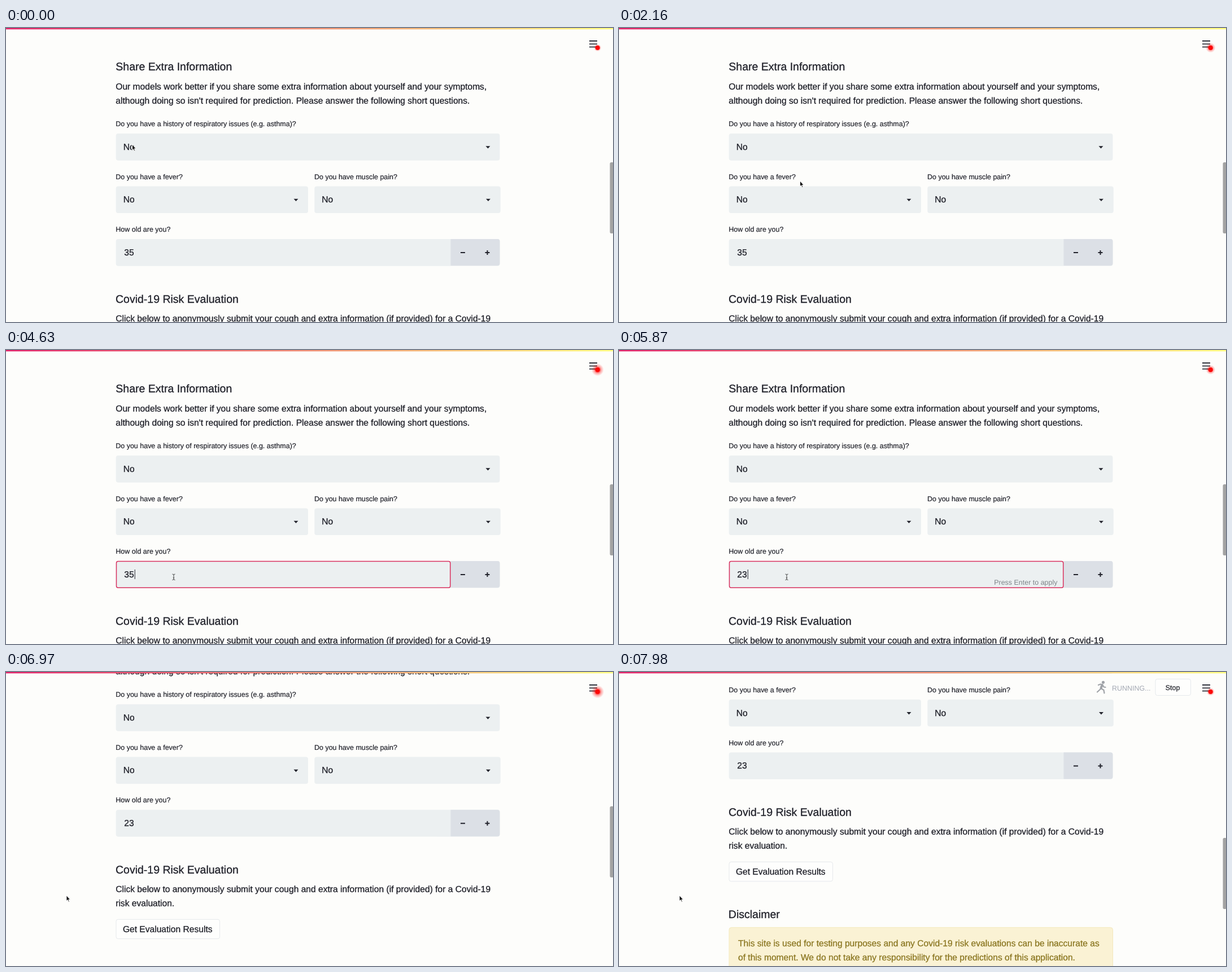
Recreate the animation shown at these times as an HTML page. Size 1075 by 521 pixels, loop 8000 ms.

```html
<!DOCTYPE html>
<html lang="en">
<head>
<meta charset="utf-8">
<title>Share Extra Information</title>
<style>
  html, body { margin: 0; width: 100%; height: 100%; overflow: hidden; background: #fdfdfb; }
  svg { display: block; width: 1075px; height: 521px; }
  text {
    font: 15.6px "Liberation Sans", Arial, sans-serif;
    fill: #1f2029; stroke: #1f2029; stroke-width: .3px;
    text-rendering: geometricPrecision; white-space: pre;
  }
  .h { font-size: 19.5px; }
  .s { font-size: 12.48px; stroke-width: .2px; }
  .field { fill: #ecf0f1; }
  .btn { fill: #fefefd; stroke: #e6e9ec; }
  .warn { fill: #8a7620; stroke: #8a7620; }
  .dim { fill: #a3a8b3; stroke: none; }
  .hint { fill: #7d8388; stroke: none; }
</style>
</head>
<body>
<svg viewBox="0 0 1075 521">
  <defs>
    <linearGradient id="bar">
      <stop stop-color="#e2226a"/><stop offset="1" stop-color="#fffd80"/>
    </linearGradient>
    <radialGradient id="halo">
      <stop offset=".3" stop-color="#f00" stop-opacity=".75"/>
      <stop offset=".6" stop-color="#f00" stop-opacity=".3"/>
      <stop offset="1" stop-color="#f00" stop-opacity="0"/>
    </radialGradient>
    <path id="drop" d="M-4-2H4L0 2.3Z" fill="#22232c"/>
  </defs>

  <g id="page">
    <text class="h" x="194.3" y="75">Share Extra Information</text>
    <text x="194.3" y="108.7">Our models work better if you share some extra information about yourself and your symptoms,</text>
    <text x="194.3" y="133.7">although doing so isn't required for prediction. Please answer the following short questions.</text>

    <text class="s" x="194.3" y="174">Do you have a history of respiratory issues (e.g. asthma)?</text>
    <rect class="field" x="194.7" y="187" width="679.8" height="47.7" rx="4"/>
    <text x="207.7" y="215.6">No</text>
    <use href="#drop" x="853.5" y="211.3"/>

    <text class="s" x="194.3" y="267.6">Do you have a fever?</text>
    <rect class="field" x="194.7" y="280.4" width="340.3" height="47.7" rx="4"/>
    <text x="207.7" y="309.2">No</text>
    <use href="#drop" x="513.5" y="304.7"/>

    <text class="s" x="546" y="267.6">Do you have muscle pain?</text>
    <rect class="field" x="546.3" y="280.4" width="329.5" height="47.7" rx="4"/>
    <text x="559.3" y="309.2">No</text>
    <use href="#drop" x="854" y="304.7"/>

    <text class="s" x="194.3" y="361.2">How old are you?</text>
    <rect class="field" x="194.7" y="374" width="679.8" height="47.7" rx="4"/>
    <path d="M787.5 374H870.5a4 4 0 0 1 4 4V417a4 4 0 0 1-4 4H787.5Z" fill="#dce0e6"/>
    <path d="M805 398H813M848.5 398H856.5M852.5 394V402" stroke="#22232c" stroke-width="2"/>
    <text id="age" x="209.3" y="402.8">35</text>
    <g id="focus">
      <rect x="195.5" y="374.5" width="591.3" height="46.8" rx="3" fill="none" stroke="#d8315f" stroke-width="1.5"/>
      <path id="caret" d="M0 389V406" stroke="#22232c"/>
      <text id="hint" class="s hint" x="664.2" y="415.7">Press Enter to apply</text>
    </g>

    <text class="h" x="194" y="487">Covid-19 Risk Evaluation</text>
    <text x="194.2" y="519.7">Click below to anonymously submit your cough and extra information (if provided) for a Covid-19</text>
    <text x="194.2" y="544.7">risk evaluation.</text>
    <rect class="btn" x="195" y="568.2" width="183.5" height="34.3" rx="3.5"/>
    <text x="206.9" y="590.8">Get Evaluation Results</text>

    <text class="h" x="193.8" y="668">Disclaimer</text>
    <rect x="195" y="684.4" width="679.5" height="76" rx="4" fill="#faf2d4" stroke="#f3e8bd"/>
    <text class="warn" x="211" y="718">This site is used for testing purposes and any Covid-19 risk evaluations can be inaccurate as</text>
    <text class="warn" x="211" y="743">of this moment. We do not take any responsibility for the predictions of this application.</text>
  </g>

  <rect width="1075" height="2.4" fill="url(#bar)"/>

  <g id="status">
    <g fill="none" stroke="#a0a3a8" stroke-width="2.2" stroke-linecap="round" stroke-linejoin="round">
      <circle cx="857.5" cy="18.3" r="1.5" fill="#a0a3a8"/>
      <path d="M849 23L853 21.5L856.5 22.5L853.5 29.5L847 35.5M853.5 29L858.5 32L859.5 37.5M856.5 23L858.5 26.5L861.5 27"/>
      <path d="M855.5 23L853.5 29" stroke-width="4"/>
    </g>
    <text class="s dim" x="873" y="32.6">RUNNING...</text>
    <rect class="btn" x="950" y="12.5" width="62.5" height="29" rx="3.5"/>
    <text class="s" x="967.8" y="31.6">Stop</text>
  </g>

  <path d="M1033 23H1047M1033 28.3H1047M1033 33.6H1047" stroke="#30323c" stroke-width="1.8"/>
  <circle id="glow" cx="1047.7" cy="35" fill="url(#halo)"/>
  <circle cx="1047.7" cy="35" r="4" fill="#fb0808"/>
  <rect id="thumb" x="1069.5" y="238" width="7" height="126" rx="2.5" fill="#a3a3a3"/>

  <g id="mouse">
    <path id="arrow" d="M0 0V9.8L2.2 7.8L3.8 11.4L5.3 10.7L3.8 7.3H6.7Z" fill="#111" stroke="#fff" stroke-width=".9"/>
    <path id="beam" d="M-2.5 1.2Q0 1.2 0 2.7Q0 1.2 2.5 1.2M0 2.7V10M-2.5 11.5Q0 11.5 0 10Q0 11.5 2.5 11.5M-1.2 7.8H1.2" fill="none" stroke="#333" stroke-width=".9"/>
  </g>
</svg>
<script>
  const LOOP = 8000;
  const $ = id => document.getElementById(id);
  const show = (id, on) => $(id).setAttribute('visibility', on ? 'inherit' : 'hidden');

  // [time, x, y]
  const path = [[0, 223.5, 206.5], [1500, 223.5, 206.5], [2160, 320.5, 271], [2700, 322, 296],
                [3550, 297, 396], [6090, 297, 396], [6520, 107, 396]];
  // [time, offset]
  const scroll = [[0, 0], [6680, 0], [6970, 129.5], [7240, 220], [7420, 229.5], [7620, 231.6]];
  // [time, value]
  const typed = [[0, '35'], [4700, '3'], [4850, ''], [5120, '2'], [5440, '23']];
  const FOCUS = 4440, BLUR = 6560;

  function sample(keys, t, ease = u => u) {
    const i = keys.findIndex(k => k[0] > t);
    if (i < 0) return keys.at(-1).slice(1);
    const a = keys[i - 1], b = keys[i];
    const u = ease((t - a[0]) / (b[0] - a[0]));
    return a.slice(1).map((v, n) => v + (b[n + 1] - v) * u);
  }
  const smooth = u => u * u * (3 - 2 * u);

  function draw(t) {
    const [x, y] = sample(path, t, smooth);
    const [offset] = sample(scroll, t);
    $('page').setAttribute('transform', `translate(0 ${-offset})`);
    $('mouse').setAttribute('transform', `translate(${x} ${y})`);
    const inField = x > 195 && y > 370;
    show('arrow', !inField);
    show('beam', inField);

    const [since, value] = typed.findLast(k => k[0] <= t);
    const lastKey = Math.max(since, FOCUS);
    const focused = t >= FOCUS && t < BLUR;
    $('age').textContent = value;
    show('focus', focused);
    show('hint', focused && value !== '35');
    show('caret', focused && (t - lastKey) % 1000 < 500);
    $('caret').setAttribute('transform', `translate(${210.9 + value.length * 8.68} 0)`);

    const pulse = Math.sin(Math.PI * (t % 2000) / 2000) ** 0.6;
    $('glow').setAttribute('r', 6.5 + 5 * pulse);
    $('thumb').setAttribute('y', t < 7300 ? 238 : 294);
    show('status', t >= 7760);
  }

  function tick() {
    draw(performance.now() % LOOP);
    requestAnimationFrame(tick);
  }
  tick();
</script>
</body>
</html>
```
